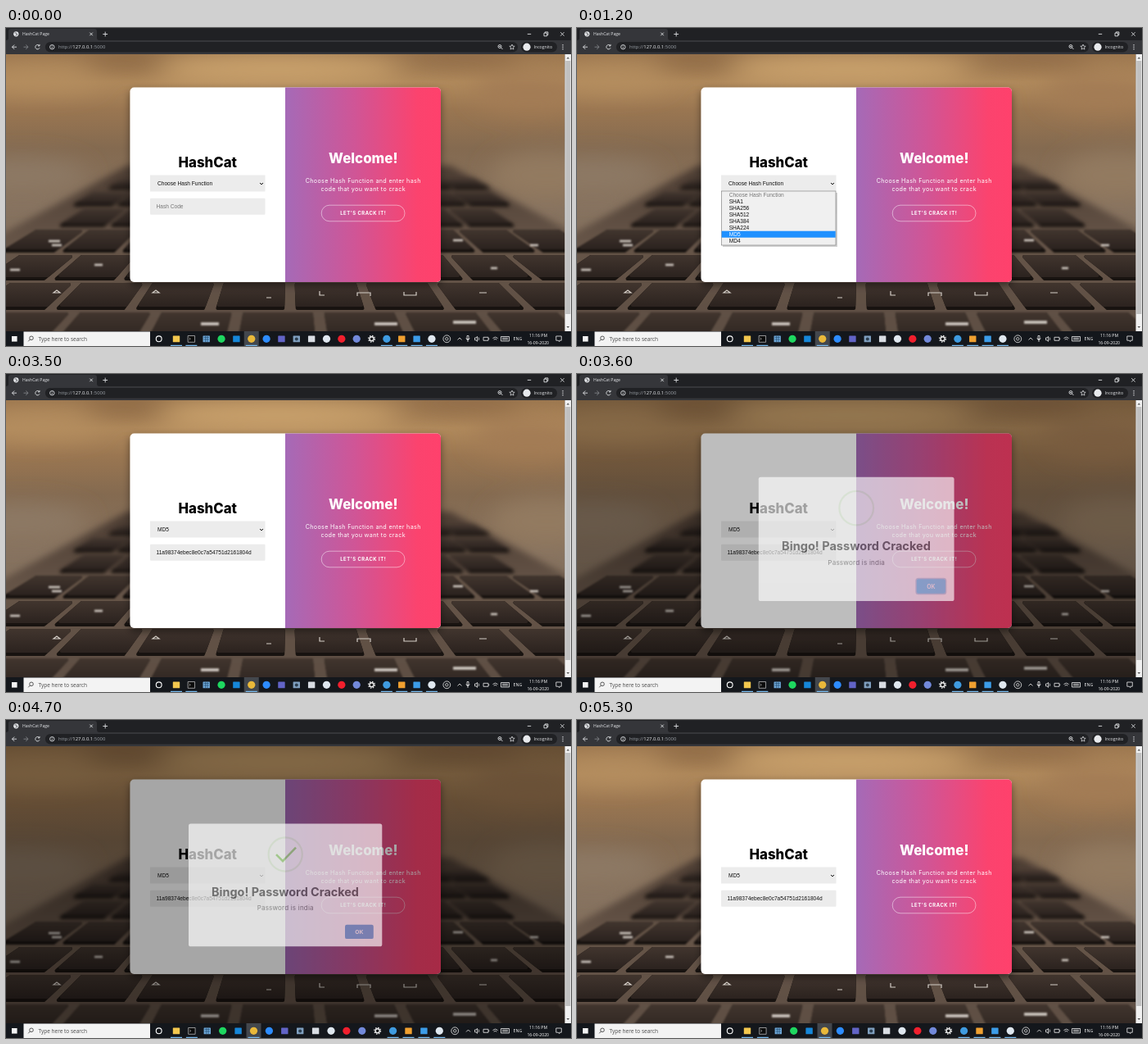
Animation, 690 px wide and 388 px high, one loop 5400 ms. Source, as an HTML page:

```html
<!DOCTYPE html>
<html lang="en">
<head>
<meta charset="utf-8">
<title>HashCat Page</title>
<style>
  html, body { margin: 0; width: 100%; height: 100%; overflow: hidden; background: #202124; }
  svg { display: block; width: 100vw; height: 100vh; }
  text { white-space: pre; }
  .ui { font-family: "Open Sans", "Noto Sans", sans-serif; }
  .form { font-family: "Liberation Sans", Arial, sans-serif; font-size: 6.6px; }
  .brand { font-family: Inter, sans-serif; text-anchor: middle; }
</style>
</head>
<body>
<svg viewBox="0 0 690 388" xmlns="http://www.w3.org/2000/svg">
  <defs>
    <linearGradient id="table" x2="0" y2="1">
      <stop offset="0" stop-color="#9c774f"/>
      <stop offset=".1" stop-color="#b18a5c"/>
      <stop offset=".2" stop-color="#9a7651"/>
      <stop offset=".34" stop-color="#846a50"/>
      <stop offset=".55" stop-color="#86725f"/>
      <stop offset="1" stop-color="#7a6858"/>
    </linearGradient>
    <linearGradient id="body" x2="0" y2="1">
      <stop offset="0" stop-color="#4b3c32"/>
      <stop offset=".4" stop-color="#665548"/>
      <stop offset="1" stop-color="#5c4d43"/>
    </linearGradient>
    <linearGradient id="pink">
      <stop offset="0" stop-color="#a56ab7"/>
      <stop offset=".45" stop-color="#d05596"/>
      <stop offset=".85" stop-color="#fb436e"/>
      <stop offset="1" stop-color="#ff416c"/>
    </linearGradient>
    <linearGradient id="keyFill" x2="0" y2="1">
      <stop offset="0" stop-color="#40342d"/>
      <stop offset="1" stop-color="#2d2420"/>
    </linearGradient>
    <filter id="soft" x="-50%" y="-50%" width="200%" height="200%"><feGaussianBlur stdDeviation="14"/></filter>
    <filter id="shade" x="-10%" y="-10%" width="120%" height="125%">
      <feDropShadow dx="0" dy="4" stdDeviation="5" flood-opacity=".45"/>
    </filter>
    <clipPath id="view"><rect y="32" width="682.5" height="338"/></clipPath>
  </defs>

  <g clip-path="url(#view)">
    <rect y="32" width="690" height="338" fill="url(#table)"/>
    <g filter="url(#soft)">
      <ellipse cx="330" cy="50" rx="150" ry="18" fill="#cba36d"/>
      <ellipse cx="45" cy="62" rx="70" ry="16" fill="#b48d5f"/>
      <ellipse cx="150" cy="38" rx="60" ry="10" fill="#8a6643"/>
      <ellipse cx="560" cy="36" rx="70" ry="10" fill="#8c6844"/>
      <ellipse cx="640" cy="80" rx="70" ry="24" fill="#a37c54"/>
      <ellipse cx="20" cy="180" rx="80" ry="22" fill="#8d7965"/>
      <ellipse cx="660" cy="180" rx="70" ry="30" fill="#937a60"/>
    </g>
    <g id="keys"></g>

    <g filter="url(#shade)"><rect x="151.5" y="72.5" width="379.5" height="237.5" rx="5" fill="#fff"/></g>
    <path d="M341 72.5h185a5 5 0 0 1 5 5v227.500a5 5 0 0 1-5 5h-185z" fill="url(#pink)"/>

    <g class="brand">
      <text x="246.200" y="169.500" font-size="16.800" font-weight="800">HashCat</text>
      <g fill="#fff">
        <text x="436.300" y="165.300" font-size="16.900" font-weight="800">Welcome!</text>
        <g font-size="7.200" letter-spacing=".33">
          <text x="436.200" y="189.200">Choose Hash Function and enter hash</text>
          <text x="436.200" y="199">code that you want to crack</text>
        </g>
        <text x="436.200" y="228.200" font-size="5.900" font-weight="700" letter-spacing=".53">LET'S CRACK IT!</text>
      </g>
    </g>
    <rect x="385.200" y="216.200" width="101.800" height="19.600" rx="9.800" fill="none" stroke="#fff" stroke-opacity=".8" stroke-width=".6"/>

    <g class="form">
      <rect x="176" y="179.500" width="140.500" height="20" fill="#ececec"/>
      <text id="choice" x="185" y="192.300" fill="#111"></text>
      <path d="M310 189l2 2 2-2" fill="none" stroke="#111" stroke-width="1"/>
      <rect id="field" x="176" y="207.700" width="140.500" height="20" rx="1" fill="#ececec" stroke="#1c1c1c"/>
      <text id="hash" x="183.500" y="220"></text>
      <g id="menu">
        <rect x="178" y="201" width="140" height="66" fill="#000" opacity=".18"/>
        <rect x="176.300" y="199" width="139.700" height="66" fill="#f0f0f0" stroke="#777" stroke-width=".6"/>
        <rect id="hover" x="176.600" width="139.100" height="8" fill="#1e90ff"/>
      </g>
    </g>

    <rect id="dim" y="32" width="683" height="338"/>
    <g id="modal">
      <rect x="223" y="126.500" width="236.300" height="149.800" rx="2.600" fill="#fff"/>
      <circle cx="341.200" cy="164" r="20.600" fill="none" stroke="#a5dc86" stroke-opacity=".25" stroke-width="2.200"/>
      <path id="tick" d="M330 164.200l8 8 16-16.500" pathLength="1" stroke-dasharray="1 2" fill="none" stroke="#a0d97f" stroke-width="2.600"/>
      <g class="brand">
        <text x="341" y="215" font-size="14.400" font-weight="700" fill="#595959">Bingo! Password Cracked</text>
        <text x="341.200" y="232.200" font-size="8" letter-spacing=".2" fill="#777">Password is india</text>
        <rect id="ring" x="412.600" y="248.300" width="37.600" height="20.200" rx="3.500" fill="#c2d8ec"/>
        <rect id="ok" x="414" y="249.700" width="34.800" height="17.400" rx="2.200"/>
        <text x="431.400" y="260.900" font-size="6.800" font-weight="700" fill="#fff">OK</text>
      </g>
    </g>
  </g>

  <g id="scroll">
    <rect x="682.500" y="32" width="7.500" height="338" fill="#f1f1f1"/>
    <rect x="683.300" y="40" width="6" height="309" fill="#c1c1c1"/>
    <path d="M684.500 37.500l1.800-2 1.800 2zM684.500 364l1.800 2 1.800-2z" fill="#505050"/>
  </g>

  <g class="ui" id="browser">
    <rect width="690" height="32" fill="#202124"/>
    <path d="M0 15q3 0 3-3V4q0-3 3-3h102q3 0 3 3v8q0 3 3 3h576v17H0z" fill="#35363a"/>
    <rect x="48" y="17" width="577" height="12.500" rx="6.200" fill="#202124"/>
    <circle cx="12.300" cy="7.300" r="3.100" fill="#e8eaed"/>
    <path d="M10.500 6h2l1 1.500-2 1.500M13 9.200l1-1" stroke="#35363a" stroke-width=".8" fill="none"/>
    <g fill="#e8eaed">
      <text x="20" y="9.300" font-size="5.100">HashCat Page</text>
      <text x="64" y="25.200" font-size="5.900"><tspan fill="#9aa0a6">http://</tspan>127.0.0.1<tspan fill="#9aa0a6">:5000</tspan></text>
      <rect x="629" y="17" width="44" height="12.500" rx="6.200" fill="#202124"/>
      <circle cx="636" cy="23.200" r="4.600"/>
      <text x="644.500" y="25.100" font-size="5.200">Incognito</text>
      <circle cx="680" cy="20.700" r=".7"/><circle cx="680" cy="23.200" r=".7"/><circle cx="680" cy="25.700" r=".7"/>
    </g>
    <g fill="none" stroke="#e8eaed" stroke-width=".85">
      <path d="M102.300 5.600l3.600 3.600m0-3.600l-3.600 3.600M118.300 7.500h5.800m-2.900-2.900v5.800"/>
      <path d="M636.800 7.400h4.400M657 6.100h3.700v3.700H657zM658.300 6V4.900h3.600v3.600h-1M677.200 5.200l4.400 4.400m0-4.400l-4.400 4.400"/>
      <path d="M13 23.200H7.500m2.700-2.700l-2.700 2.700 2.700 2.700"/>
      <path d="M21.500 23.200H27m-2.700-2.700l2.700 2.700-2.700 2.700" stroke="#85888c"/>
      <path d="M40.800 21.700a2.700 2.700 0 1 0 .2 2.600M41 19.900v2h-2"/>
      <circle cx="56.300" cy="23.200" r="2.700"/><path d="M56.300 22.800v1.900m0-3.300v.7"/>
      <circle cx="603" cy="22.500" r="2"/><path d="M604.500 24l2 2M602 22.500h2"/>
      <path d="M618 20l.9 2.100 2.300.2-1.800 1.500.6 2.300-2-1.200-2 1.200.6-2.300-1.800-1.500 2.300-.2z" stroke-width=".7"/>
    </g>
  </g>

  <g class="ui" id="taskbar">
    <rect y="370" width="690" height="18" fill="#14171c"/>
    <rect x="7" y="376" width="6.600" height="6.600" fill="#f2f2f2"/>
    <rect x="21.500" y="370.500" width="154.500" height="17.500" fill="#f3f3f3"/>
    <g fill="none" stroke="#333" stroke-width=".8"><circle cx="31" cy="378.300" r="2.300"/><path d="M29.400 380l-2.200 2.300"/></g>
    <text x="39.500" y="381.500" font-size="6.500" fill="#4a4a4a">Type here to search</text>
    <circle cx="186.700" cy="379.300" r="3.400" fill="none" stroke="#fff" stroke-width="1.100"/>
    <g id="apps"></g>
    <g fill="none" stroke="#eee" stroke-width=".8">
      <path id="chevron" d="M-2.500 380.500l2.500-2.500 2.500 2.500"/>
      <path id="mic" d="M563 375.500h2v4h-2zM561.800 378.500q2.200 4.500 4.400 0M564 381v2"/>
      <path d="M572.500 378h1.400l1.600-1.600v6l-1.600-1.600h-1.400zM577 377.500q1.400 1.800 0 3.600"/>
      <path d="M583 377.300h6v4h-6zM589.700 378.500v1.600M594.500 378.500q3-2.800 6 0m-4.800 1.700q1.800-1.500 3.600 0"/>
      <path d="M604.500 376.500h10v5.500h-10zM606 378.300h7m-7 1.700h7"/>
      <path d="M671.800 376h6.500v5.200h-2.500v1.500l-1.600-1.500h-2.400z"/>
    </g>
    <g fill="#fff">
      <text x="619.500" y="381.300" font-size="5.300">ENG</text>
      <g font-size="5.100" text-anchor="middle">
        <text x="650" y="377.200">11:16 PM</text><text x="649.700" y="386">16-09-2020</text>
      </g>
    </g>
  </g>
</svg>
<script>
const LOOP = 5400, STEP = 100;
const $ = id => document.getElementById(id);

function add(parent, tag, attrs, text) {
  const el = document.createElementNS('http://www.w3.org/2000/svg', tag);
  for (const k in attrs) el.setAttribute(k, attrs[k]);
  if (text) el.textContent = text;
  return parent.appendChild(el);
}

// Laptop: columns fan out from a vanishing point behind the card
const fan = (u, y) => `${(345 + u * (y - 60) * .345).toFixed(1)} ${y}`;
const quad = (u0, u1, y0, y1) => `M${fan(u0, y0)}L${fan(u1, y0)}L${fan(u1, y1)}L${fan(u0, y1)}Z`;
const EDGE = 5.3;
add($('keys'), 'path', { d: quad(-EDGE, EDGE, 168, 400), fill: 'url(#body)', style: 'filter:blur(4px)' });

// Key rows: [top, height, column shift, blur]
const rows = [
  [186, 8, .3, 3], [202, 12, .1, 2.6], [222, 17, .5, 2], [248, 22, .2, 1.3],
  [279, 25, .6, .7], [313, 27, .05, .5], [349, 34, .4, 1]
];
for (const [y, h, shift, blur] of rows) {
  const row = add($('keys'), 'g', { style: `filter:blur(${blur}px)` });
  for (let u = shift - 5; u + .88 < EDGE; u++) {
    const key = (y1, fill) => add(row, 'path', {
      d: quad(u + .06, u + .88, y, y1), fill, stroke: fill, 'stroke-width': 4, 'stroke-linejoin': 'round'
    });
    key(y + h + 2, '#181310');
    key(y + h - 2, 'url(#keyFill)');
  }
}
const legends = (d, blur, width) => add($('keys'), 'path', {
  d, fill: 'none', stroke: '#d6cfc8', 'stroke-width': width, style: `filter:blur(${blur}px)`
});
legends('M58 323l4-3 4 3zM179 323l4-3 4 3zM318 329h6M383 321v5h6M429 327v-4h16v4M486 322v4h15v-4M578 323h9', .3, 1.2);
legends('M52 260h14M56 265h12M108 289h10M5 295h12M546 259h12M592 293h8M640 265h10', 1, 2.5);
legends('M238 361h22M450 361h28M546 359h28', 1.2, 3.5);

// Taskbar apps: colour and shape (c circle, s square, or an outline), then u when running
const apps = ['#f3c74e s u', '#0b0b0b s u', '#6fa8d8 s', '#1ed760 c', '#1687d9 s', '#e9b83a c u', '#2d8cff c',
  '#6264c7 s', '#7f9fbf s', '#d9dde3 s', '#dfe7ef c', '#f01f2d c', '#7289da c', '#eee gear',
  '#3f9be0 c u', '#f0a030 s u', '#3c9ce8 s u', '#dfe7ef c u', '#eee rings'
].map((spec, i) => {
  const [fill, kind, on] = spec.split(' '), app = add($('apps'), 'g', {});
  const ring = (r, width, dash = 'none') => add(app, 'circle', {
    cy: 379.3, r, fill: 'none', stroke: fill, 'stroke-width': width, 'stroke-dasharray': dash
  });
  if (i === 5) add(app, 'rect', { x: -9, y: 370, width: 18, height: 18, fill: '#43474d' });
  if (kind === 'c') add(app, 'circle', { cy: 379.3, r: 4.6, fill });
  if (kind === 's') add(app, 'rect', { x: -4.2, y: 375.5, width: 8.4, height: 7.8, rx: .6, fill });
  if (kind === 'gear') { ring(2.5, 1.4); ring(3.9, 1.2, '1.5 1.56'); }
  if (kind === 'rings') { ring(4.4, .8); ring(1.7, .8); }
  if (on) add(app, 'rect', { x: -7, y: 386.8, width: 14, height: 1.2, fill: '#76b9ed' });
  return app;
});
add(apps[1], 'path', { d: 'M-4.2 375.5h8.4v7.8h-8.4zM-2.7 378l1.6 1.300-1.6 1.300', fill: 'none', stroke: '#ccc', 'stroke-width': .7 });
add(apps[2], 'path', { d: 'M-3.2 377.5h6.4M-3.2 380h6.400M-1.2 376v7M1.2 376v7', stroke: '#1d4568', 'stroke-width': .6 });
add(apps[8], 'circle', { cy: 379.5, r: 2, fill: '#2c3e50' });

const options = ['Choose Hash Function', 'SHA1', 'SHA256', 'SHA512', 'SHA384', 'SHA224', 'MD5', 'MD4'];
const rowY = i => 199.4 + i * 8.1;
const labels = options.map((s, i) =>
  add($('menu'), 'text', { x: 185.7, y: rowY(i) + 6.2, fill: i ? '#111' : '#777' }, s));

const clamp = v => Math.max(0, Math.min(1, v));
const ease = v => (v = clamp(v)) * v * (3 - 2 * v);
const ramp = (t, from, len) => clamp((t - from) / len);
const show = (id, on) => $(id).setAttribute('visibility', on ? 'visible' : 'hidden');
const set = (id, k, v) => $(id).setAttribute(k, v);

// Pop-in: half size, overshoot, undershoot, rest
function popScale(p) {
  const pts = [[0, .5], [.45, 1.05], [.8, .95], [1, 1]];
  for (let i = 1; i < pts.length; i++) {
    const [a, u] = pts[i - 1], [b, v] = pts[i];
    if (p <= b) return u + (v - u) * ease((p - a) / (b - a));
  }
  return 1;
}

const OPEN = 600, PICK = 1500, FOCUS = 2000, PASTE = 2700, BLUR = 3200;
const ALERT = 3510, MIC_OFF = 3800, CLOSE = 4667;
const FADE = 150, POP = 100;

function draw(t) {
  const open = t >= OPEN && t < PICK;
  show('menu', open);
  const at = Math.round(6 * ramp(t, OPEN, 500));
  show('hover', open && at > 0);
  set('hover', 'y', rowY(at) - .3);
  labels.forEach((el, i) => i && el.setAttribute('fill', i === at ? '#fff' : '#111'));
  $('choice').textContent = options[t < PICK ? 0 : 6];

  const pasted = t >= PASTE;
  $('hash').textContent = pasted ? '11a98374ebec8e0c7a54751d2161804d' : 'Hash Code';
  set('hash', 'fill', pasted ? '#111' : '#777');
  set('field', 'stroke-width', t >= FOCUS && t < BLUR ? 1.2 : 0);

  const fade = len => ease(ramp(t, ALERT, len)) * (1 - ease(ramp(t, CLOSE, len)));
  const dim = fade(FADE), s = popScale(ramp(t, ALERT, FADE));
  set('dim', 'opacity', .4 * dim);
  set('modal', 'opacity', dim * fade(POP));
  set('modal', 'transform', `translate(341 201) scale(${s}) translate(-341 -201)`);
  set('tick', 'stroke-dashoffset', 1 - ramp(t, ALERT + 180, 150));
  const pressed = t >= CLOSE;
  set('ring', 'opacity', pressed ? 0 : 1);
  set('ok', 'fill', pressed ? '#6fa6dc' : '#7cd1f9');

  // The tray loses its microphone and the app icons spread out
  const mic = t < MIC_OFF, pitch = mic ? 18.35 : 18.9;
  show('mic', mic);
  set('chevron', 'transform', `translate(${mic ? 554 : 564.5})`);
  apps.forEach((app, i) => app.setAttribute('transform', `translate(${208 + i * pitch})`));
}

const start = performance.now();
function tick() {
  const t = (performance.now() - start) % LOOP;
  draw(Math.floor(t / STEP) * STEP);
  requestAnimationFrame(tick);
}
tick();
</script>
</body>
</html>
```
